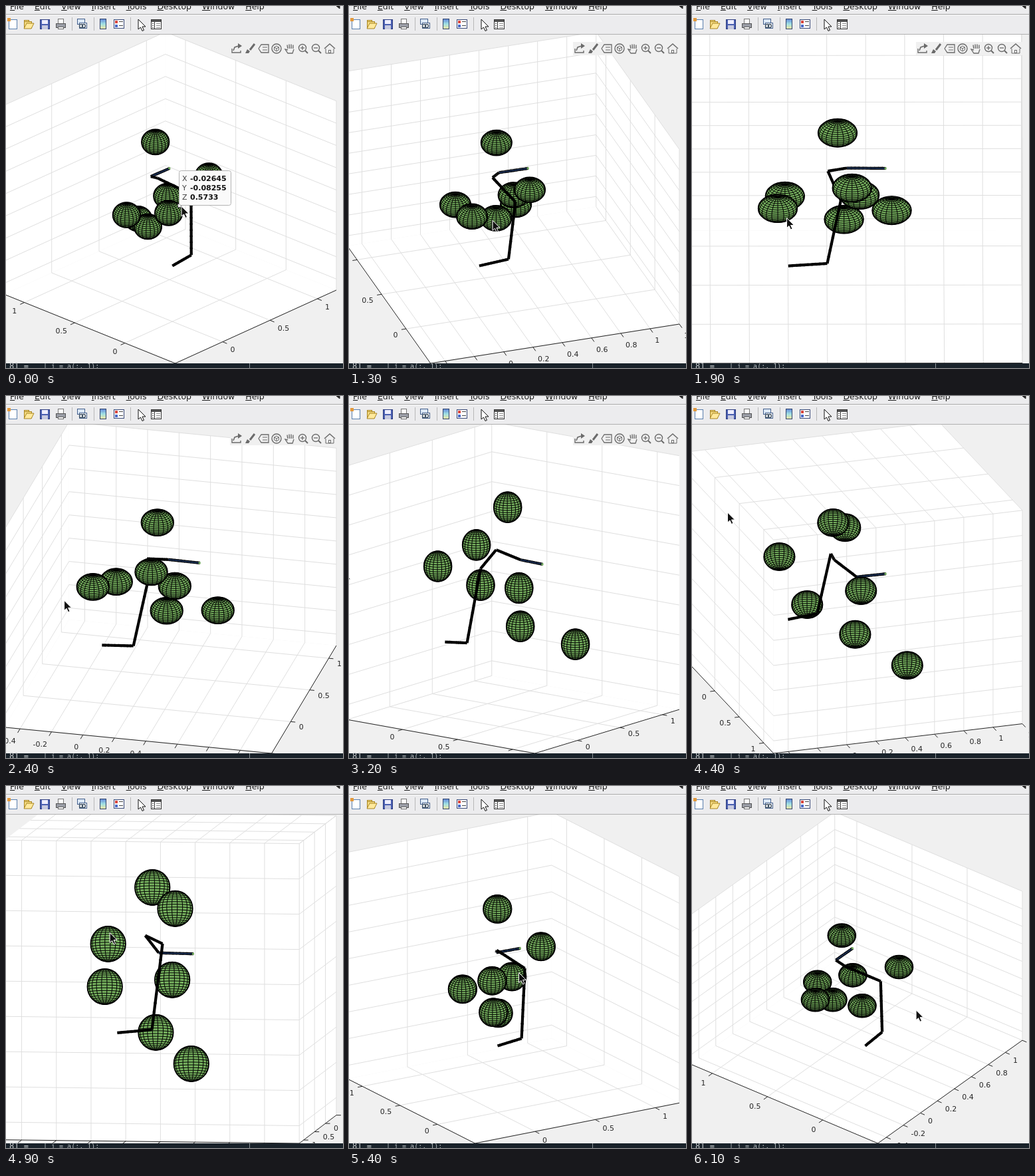
These frames come from a looping animation (507x544 px, 6.2 s). An HTML page with a canvas:

```html
<!DOCTYPE html>
<html lang="en">
<head>
<meta charset="utf-8">
<title>Robot arm among spheres</title>
<style>
html, body { margin: 0; width: 100%; height: 100%; overflow: hidden; background: #f0f0f0; }
canvas { display: block; }
</style>
</head>
<body>
<canvas id="stage" width="507" height="544"></canvas>
<script>
const g = document.getElementById('stage').getContext('2d');
const LOOP = 6200, STEP = 100, TIP_END = 400;
const REGRAB = 3800; // the pointer has left the window and a second drag begins
const H = 0.85, MID = 0.35; // axes run from -0.5 to 1.2; scene points are relative to their middle
const SANS = '"DejaVu Sans", sans-serif', MONO = '"DejaVu Sans Mono", monospace';
const GREEN = '#77b25f', INK = '#6b6b6b';

// time, azimuth, elevation
const keys = [
  [750, -46.7, 28], [1300, -18.5, 35.3], [2400, 13.6, 29.3], [3200, 37.6, 12.3],
  [3800, 40, -5], [4400, 18.5, -23.6], [5400, -32, 18.6], [6100, -52.4, 41.1]
];
const spheres = [
  [-.096, .058, .516], [-.023, -.405, .353], [-.404, -.364, .152], [-.366, .09, -.047],
  [.017, .045, -.008], [-.063, .164, -.296], [.183, .493, -.44]
];
const links = [[.2, 0, .02], [.07, .068, .495], [-.066, .27, .071], [.098, .161, -.082], [.2, 0, -.003]];
const joints = [[-MID, -MID, -MID]];
for (const link of links) joints.push(joints.at(-1).map((a, n) => a + link[n]));

const smooth = u => u * u * (3 - 2 * u);

function slope(i, n) {
  const a = keys[Math.max(i - 1, 0)], b = keys[Math.min(i + 1, keys.length - 1)];
  return (b[n] - a[n]) / (b[0] - a[0]);
}

function viewAngles(t) {
  t = Math.min(Math.max(t, keys[0][0]), keys.at(-1)[0]);
  const i = Math.max(0, keys.findIndex(k => k[0] >= t) - 1);
  const a = keys[i], b = keys[i + 1], span = b[0] - a[0], u = (t - a[0]) / span;
  return [1, 2].map(n => a[n] + (b[n] - a[n]) * smooth(u) +
    span * u * (1 - u) * (slope(i, n) * (1 - u) - slope(i + 1, n) * u));
}

// Dragging turns the view, so the pointer follows the angles
function pointerAt(t, az, el) {
  const x = (t < REGRAB ? 142 : 127.5) - 4 * az, y = 234 + 2.5 * el;
  const u = smooth(Math.min(1, t / keys[0][0]));
  return [264 + (x - 264) * u, 301 + (y - 301) * u];
}

// Orthographic view, stretched so that the box fills the plot area
function makeView(az, el) {
  const rad = Math.PI / 180;
  const c = Math.cos(az * rad), s = Math.sin(az * rad);
  const ce = Math.cos(el * rad), se = Math.sin(el * rad);
  const wide = Math.abs(c) + Math.abs(s);
  const sx = 499.5 / 1.7 / wide, sy = 498 / 1.7 / (ce + Math.abs(se) * wide);
  const depth = p => ce * (s * p[0] - c * p[1]) + se * p[2];
  const offset = p => [sx * (c * p[0] + s * p[1]), -sy * (se * (c * p[1] - s * p[0]) + ce * p[2])];
  const project = p => { const o = offset(p); return [247.2 + o[0], 288 + o[1]]; };
  const step = (dx, dy) => dx >= 40 || (dy >= 17 && dx >= 20) ? .2 : .5;
  return {
    sx, sy, depth, offset, project,
    back: [s > 0 ? -H : H, c > 0 ? H : -H, se >= 0 ? -H : H],
    low: se >= 0 ? -1 : 1,
    steps: [
      step(.2 * sx * Math.abs(c), .2 * sy * Math.abs(se * s)),
      step(.2 * sx * Math.abs(s), .2 * sy * Math.abs(se * c)),
      .2
    ]
  };
}

function ticks(step) {
  const out = [];
  for (let i = Math.ceil(-.5 / step); i * step < 1.2001; i++) out.push(i * step);
  return out;
}

function path(pts, stroke, width = 1, fill) {
  g.beginPath();
  pts.forEach(p => g.lineTo(p[0], p[1]));
  if (fill) { g.closePath(); g.fillStyle = fill; g.fill(); }
  if (stroke) { g.strokeStyle = stroke; g.lineWidth = width; g.stroke(); }
}
const line = (x1, y1, x2, y2, color, width) => path([[x1, y1], [x2, y2]], color, width);
function box(x, y, w, h, fill, stroke) {
  if (fill) { g.fillStyle = fill; g.fillRect(x, y, w, h); }
  if (stroke) { g.strokeStyle = stroke; g.lineWidth = 1; g.strokeRect(x + .5, y + .5, w - 1, h - 1); }
}
function ring(x, y, r, color, width = 1.4) {
  g.beginPath(); g.arc(x, y, r, 0, 7);
  g.strokeStyle = color; g.lineWidth = width; g.stroke();
}
function at(x, y, draw) {
  g.save(); g.translate(x, y); draw(); g.restore();
}
function label(text, x, y, font, color, align = 'left', base = 'middle') {
  g.font = font; g.fillStyle = color; g.textAlign = align; g.textBaseline = base;
  g.fillText(text, x, y);
}

function drawAxes(v) {
  // A point with the given coordinates on two axes and the back wall's on the third
  const put = (wall, axis, value, other, end) => {
    const p = [];
    p[wall] = v.back[wall]; p[axis] = value; p[other] = end;
    return v.project(p);
  };
  for (const wall of [0, 1, 2]) {
    const a = (wall + 1) % 3, b = (wall + 2) % 3;
    path([[-H, -H], [H, -H], [H, H], [-H, H]].map(q => put(wall, a, q[0], b, q[1])), null, 1, '#fff');
  }
  for (const wall of [0, 1, 2]) for (const axis of [0, 1, 2]) if (axis !== wall)
    for (const t of ticks(v.steps[axis]))
      path([-H, H].map(end => put(wall, axis, t - MID, 3 - wall - axis, end)), '#dfdfdf');
  const lx = v.low * v.back[0], ly = v.low * v.back[1];
  drawRuler(v, v.steps[0], x => [x, ly, -H], [0, ly, 0]);
  drawRuler(v, v.steps[1], y => [lx, y, -H], [lx, 0, 0]);
}

function drawRuler(v, step, point, outward) {
  path([-H, H].map(e => v.project(point(e))), '#262626');
  const o = v.offset(outward), len = Math.hypot(...o), dx = o[0] / len, dy = o[1] / len;
  for (const t of ticks(step)) {
    const [x, y] = v.project(point(t - MID));
    line(x, y, x + 7 * dx, y + 7 * dy, '#262626');
    label(String(+t.toFixed(1)), x + 12.5 * dx, y + 13 * dy + 8, '11px ' + SANS, '#262626', dx > 0 ? 'left' : 'right');
  }
}

// Visible half of a 20 by 20 sphere mesh
function sphereMesh(v) {
  const mesh = new Path2D(), N = 20;
  const point = (i, j) => {
    const th = 2 * Math.PI * i / N, ph = Math.PI * (j / N - .5);
    return [.1 * Math.cos(ph) * Math.cos(th), .1 * Math.cos(ph) * Math.sin(th), .1 * Math.sin(ph)];
  };
  const edge = (p, q) => {
    if (v.depth(p) + v.depth(q) < 0) return;
    mesh.moveTo(...v.offset(p)); mesh.lineTo(...v.offset(q));
  };
  for (let i = 0; i < N; i++) for (let j = 0; j < N; j++) {
    const p = point(i, j);
    edge(p, point(i + 1, j)); edge(p, point(i, j + 1));
  }
  return mesh;
}

function drawScene(v) {
  const mesh = sphereMesh(v), items = [], PARTS = 10;
  for (const p of spheres) items.push([v.depth(p), () => at(...v.project(p), () => {
    g.beginPath(); g.ellipse(0, 0, .1 * v.sx, .1 * v.sy, 0, 0, 7);
    g.fillStyle = GREEN; g.fill();
    g.strokeStyle = '#000'; g.lineWidth = 1.7; g.stroke();
    g.lineWidth = 1; g.stroke(mesh);
  })]);
  // Links are cut into short parts so that they sort correctly against the spheres
  links.forEach((link, k) => {
    const last = k === links.length - 1;
    const along = u => joints[k].map((a, n) => a + link[n] * u);
    for (let i = 0; i < PARTS; i++) items.push([v.depth(along((i + .5) / PARTS)), () => {
      const pts = [i, Math.min(PARTS, i + 1.2)].map(n => v.project(along(n / PARTS)));
      path(pts, '#000', 4.2);
      if (last) path(pts, '#1c3055', 2);
      if (last && i === PARTS - 1) box(pts[1][0] - 2, pts[1][1] - 1.5, 3, 3, GREEN);
    }]);
  });
  items.sort((a, b) => a[0] - b[0]).forEach(item => item[1]());
}

function drawTip() {
  box(258, 297, 6, 6, '#eee', '#555');
  g.beginPath(); g.roundRect(260.5, 247.5, 78, 52, 3);
  g.fillStyle = '#fafafa'; g.fill();
  g.strokeStyle = '#b4b4b4'; g.lineWidth = 1; g.stroke();
  ['-0.02645', '-0.08255', '0.5733'].forEach((value, i) => {
    label('XYZ'[i], 265, 260.5 + 14 * i, '11px ' + SANS, '#404040');
    label(value, 277, 260.5 + 14 * i, 'bold 11px ' + SANS, '#111');
  });
}

function drawPointer(x, y, fill, edge) {
  at(x, y, () => path([[0, 0], [0, 15], [3.5, 12], [6, 17.5], [8.5, 16.3], [6, 11], [11, 11], [0, 0]], edge, 1, fill));
}

function drawMenus() {
  box(0, 0, 507, 43, '#ececee');
  let x = 6;
  for (const name of ['File', 'Edit', 'View', 'Insert', 'Tools', 'Desktop', 'Window', 'Help']) {
    label(name, x, 5, '12.5px ' + SANS, '#1a1a1a', 'left', 'alphabetic');
    box(x, 6, g.measureText(name[0]).width, 1, '#1a1a1a');
    x += g.measureText(name).width + 16;
  }
  path([[497, 0], [502, 4], [502, 0]], '#222', 1, '#222');
  box(0, 12, 507, 1, '#a8a8a8');
  box(0, 13, 507, 1, '#fafafa');
  box(0, 42, 507, 1, '#b0b0b0');
  for (const gap of [99, 132, 187]) box(gap, 17, 1, 20, '#b8b8b8');
  const icons = [newIcon, openIcon, saveIcon, printIcon];
  icons.forEach((icon, i) => at(10 + 24 * i, 27, icon));
  at(114, 27, linkIcon);
  at(146, 27, colorBarIcon);
  at(170, 27, legendIcon);
  drawPointer(199, 20, '#fff', '#111');
  at(226, 27, inspectorIcon);
}

function newIcon() {
  box(-6, -7, 13, 15, '#fff', '#5a7fae');
  box(-8, -9, 5, 5, '#e39a3c');
}
function openIcon() {
  box(-7, -6, 8, 4, '#f5dc82', '#a88422');
  box(-7, -4, 12, 11, '#f5dc82', '#a88422');
  path([[-7, 7], [-3, -1], [8, -1], [4, 7]], '#a88422', 1, '#ffe99c');
}
function saveIcon() {
  box(-7, -7, 15, 15, '#4a5fb0', '#2d3c80');
  box(-4, -6, 9, 6, '#eef');
  box(-4, 2, 9, 6, '#c8cbe0');
}
function printIcon() {
  box(-4, -8, 9, 8, '#fff', '#777');
  box(-7, -1, 15, 7, '#9a9da6', '#555');
  box(-4, 4, 9, 4, '#fff', '#666');
}
function linkIcon() {
  box(-7, -8, 12, 9, '#dce8f6', '#44608c');
  box(-4, -2, 12, 9, '#fff', '#44608c');
  for (const x of [-1, 3]) ring(x, 3, 2.5, '#445566');
}
function colorBarIcon() {
  const bar = g.createLinearGradient(0, -8, 0, 8);
  ['#5d7fd6', '#9fe0e4', '#f4e69a'].forEach((color, i) => bar.addColorStop(i / 2, color));
  box(-5, -8, 10, 16, bar, '#33466e');
}
function legendIcon() {
  box(-8, -7, 16, 14, '#fff', '#3a4a78');
  ['#d8453c', '#4767c8'].forEach((color, i) => {
    box(-6, 6 * i - 5, 4, 4, color);
    box(0, 6 * i - 4, 6, 1, '#444');
  });
}
function inspectorIcon() {
  box(-8, -7, 16, 15, '#fff', '#333');
  box(-7, -6, 14, 3, '#555');
  box(-3, -3, 1, 10, '#333');
  for (let y = -1; y < 6; y += 3) { box(-6, y, 2, 1, '#555'); box(0, y, 6, 1, '#888'); }
}

function shareIcon() {
  path([[-7, 0], [-7, 6], [6, 6], [6, 3]], INK, 1.4);
  path([[-5, 3], [-3, -2], [3, -4]], INK, 1.6);
  path([[2, -8], [8, -4], [2, 0]], null, 1, INK);
}
function brushIcon() {
  line(7, -7, 0, 2, INK, 3);
  path([[-7, 7], [-4, 1], [0, 4], [-2, 7]], null, 1, INK);
}
function tagIcon() {
  path([[-7, 0], [-3, -6], [8, -6], [8, 6], [-3, 6], [-7, 0]], INK, 1.3);
  for (const y of [-2, 2]) line(-1, y, 6, y, INK);
}
function rotateIcon() {
  const corner = i => [4 * Math.sin(i * Math.PI / 3), -4 * Math.cos(i * Math.PI / 3)];
  ring(0, 0, 7, INK);
  path([0, 1, 2, 3, 4, 5, 6].map(corner), INK);
  for (const i of [1, 3, 5]) line(0, 0, ...corner(i), INK);
}
function handIcon() {
  for (let i = 0; i < 4; i++) line(-3 + 2.6 * i, 0, -4 + 3 * i, -7 + Math.abs(i - 1.5), INK, 1.4);
  path([[6, 1], [4, 7], [-3, 7], [-7, 1], [-3, 2]], INK, 1.3);
}
function zoomIcon(plus) {
  ring(-1, -1, 5.5, INK);
  line(3, 3, 7, 7, INK, 2);
  line(-4, -1, 2, -1, INK, 1.3);
  if (plus) line(-1, -4, -1, 2, INK, 1.3);
}
function homeIcon() {
  path([[-8, 0], [0, -7], [8, 0]], INK, 1.5);
  path([[-6, 0], [-6, 7], [6, 7], [6, 0]], INK);
  box(-2, 2, 4, 5, null, INK);
}
function drawPlotTools() {
  box(337, 54, 160, 20, '#f0f0f0');
  [shareIcon, brushIcon, tagIcon, rotateIcon, handIcon, () => zoomIcon(true), () => zoomIcon(false), homeIcon]
    .forEach((icon, i) => at(347 + 20 * i, 64, icon));
}

function drawEditor() {
  box(0, 537, 507, 7, '#19222a');
  label('81 =', 5, 545, '12px ' + MONO, '#c4c8ca', 'left', 'alphabetic');
  label('| i = a(:, 1);', 56, 545, '10px ' + MONO, '#b4babd', 'left', 'alphabetic');
  box(366, 537, 1, 7, '#8a9297');
}

function draw(t) {
  const [az, el] = viewAngles(t), view = makeView(az, el);
  box(0, 0, 507, 544, '#f0f0f0');
  drawAxes(view);
  drawScene(view);
  if (t < REGRAB) drawPlotTools();
  if (t < TIP_END) drawTip();
  drawMenus();
  drawEditor();
  drawPointer(...pointerAt(t, az, el), '#111', '#fff');
}

function tick() {
  draw(Math.floor(performance.now() % LOOP / STEP) * STEP);
  requestAnimationFrame(tick);
}
tick();
</script>
</body>
</html>
```
